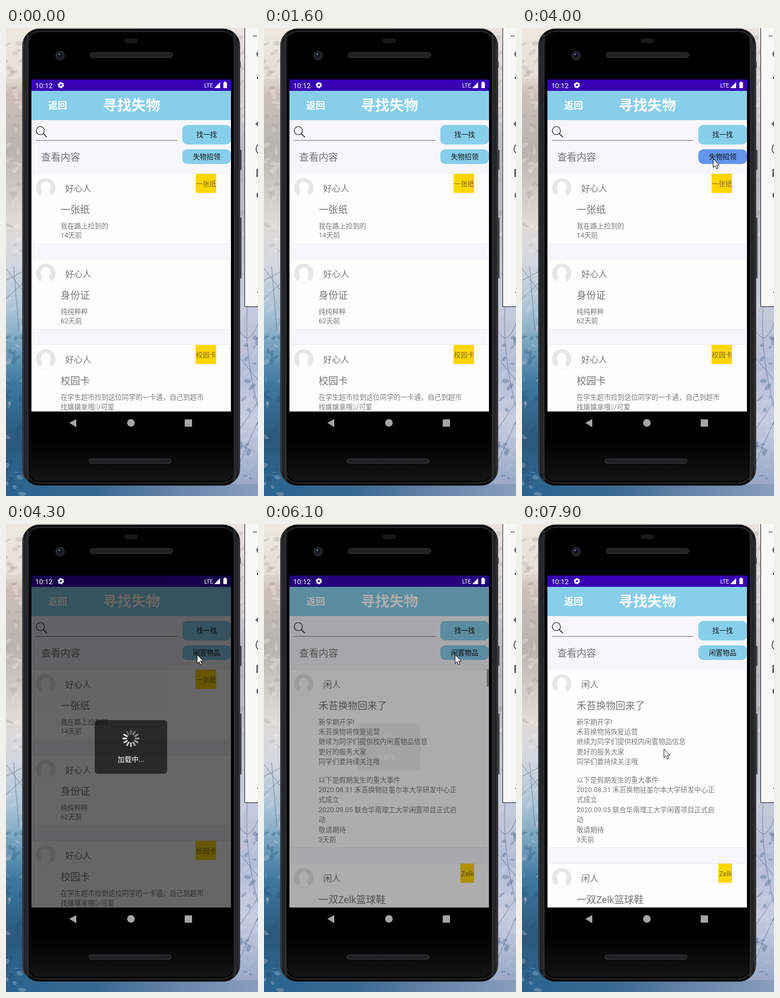
An HTML page for the animation above (8000 ms loop, 466 by 864 pixels).

```html
<!DOCTYPE html>
<html lang="zh-CN">
<head>
<meta charset="utf-8">
<title>寻找失物</title>
<style>
  html, body { margin: 0; width: 100%; height: 100%; overflow: hidden; background: #000; }
  svg { display: block; width: 466px; height: 864px; font-family: Roboto, "Noto Sans CJK SC", "Noto Sans CJK", sans-serif; }
  .small { font-size: 12.6px; fill: #7b7b7b; }
  .title { font-size: 18px; fill: #757575; }
  .name { font-size: 16px; fill: #757575; }
  .tag { font-size: 12.6px; fill: #7d6d1c; text-anchor: middle; }
  .caption { fill: #fff; font-weight: 600; }
  .label { font-size: 12.7px; font-weight: 500; fill: #101418; text-anchor: middle; }

  .list-a, .list-b, .label-a, .label-b, .pressable, .dim, .dialog, .scrollbar, .cursor {
    animation-duration: 8s; animation-iteration-count: infinite; animation-timing-function: linear;
  }
  .list-a { animation-name: until-loaded; animation-timing-function: step-end; }
  .list-b { animation-name: after-loaded; animation-timing-function: step-end; }
  .label-a { animation-name: until-pressed; animation-timing-function: step-end; }
  .label-b { animation-name: after-pressed; animation-timing-function: step-end; }
  .pressable { animation-name: press; animation-timing-function: step-end; }
  .dim { animation-name: dim; }
  .dialog { animation-name: dialog; transform-origin: 231px 412px; }
  .scrollbar { animation-name: scrollbar; }
  .cursor { animation-name: cursor; }
  .spinner { animation: spin 1s steps(12) infinite; transform-origin: 231px 396px; }

  @keyframes until-loaded { 0% { visibility: visible } 75%, 100% { visibility: hidden } }
  @keyframes after-loaded { 0% { visibility: hidden } 75%, 100% { visibility: visible } }
  @keyframes until-pressed { 0% { visibility: visible } 52%, 100% { visibility: hidden } }
  @keyframes after-pressed { 0% { visibility: hidden } 52%, 100% { visibility: visible } }
  @keyframes press { 0% { fill: #87ceeb } 48.7% { fill: #6495ed } 52%, 100% { fill: #87ceeb } }
  @keyframes dim {
    0%, 51.2% { opacity: 0 } 53.7%, 75% { opacity: .6 } 76.25% { opacity: .32 } 78.2%, 100% { opacity: 0 }
  }
  @keyframes dialog {
    0%, 51.2% { opacity: 0; transform: scale(.9) } 53.5%, 75% { opacity: 1; transform: none }
    76.25% { opacity: .08; transform: scale(.88) } 77%, 100% { opacity: 0; transform: scale(.85) }
  }
  @keyframes scrollbar { 0%, 74.99% { opacity: 0 } 75%, 79% { opacity: 1 } 82%, 100% { opacity: 0 } }
  @keyframes cursor {
    0%, 24.9% { transform: translate(480px, 338px) }
    25% { transform: translate(466px, 330px); animation-timing-function: ease-out }
    30%, 32% { transform: translate(364px, 271px); animation-timing-function: ease-in-out }
    40%, 88% { transform: translate(353px, 241px); animation-timing-function: ease-in-out }
    98%, 100% { transform: translate(262px, 415px) }
  }
  @keyframes spin { to { transform: rotate(360deg) } }
</style>
</head>
<body>
<svg viewBox="0 0 466 864">
  <defs>
    <linearGradient id="left" x2="0" y2="1">
      <stop stop-color="#efe9e0"/><stop offset=".1" stop-color="#e6ded6"/>
      <stop offset=".14" stop-color="#cbc0b8"/><stop offset=".26" stop-color="#b9b3b0"/>
      <stop offset=".41" stop-color="#dfd9d6"/><stop offset=".5" stop-color="#d5d7de"/>
      <stop offset=".6" stop-color="#aac4d6"/><stop offset=".69" stop-color="#6d9cba"/>
      <stop offset=".76" stop-color="#3f789f"/><stop offset=".88" stop-color="#2b587c"/>
      <stop offset="1" stop-color="#306a94"/>
    </linearGradient>
    <linearGradient id="right" x2="0" y2="1">
      <stop stop-color="#e9e4e2"/><stop offset=".3" stop-color="#b7b4bc"/>
      <stop offset=".6" stop-color="#c6cadc"/><stop offset=".72" stop-color="#b2bdd6"/>
      <stop offset=".84" stop-color="#c6cce0"/><stop offset="1" stop-color="#8fa2c2"/>
    </linearGradient>
    <linearGradient id="ground">
      <stop stop-color="#2a648f"/><stop offset=".35" stop-color="#376891"/>
      <stop offset=".65" stop-color="#6482a8"/><stop offset="1" stop-color="#8a9dbc"/>
    </linearGradient>
    <linearGradient id="rim">
      <stop stop-color="#46474b"/><stop offset=".012" stop-color="#141416"/><stop offset=".024" stop-color="#303134"/>
      <stop offset=".034" stop-color="#050506"/><stop offset=".966" stop-color="#050506"/>
      <stop offset=".976" stop-color="#303134"/><stop offset=".988" stop-color="#141416"/><stop offset="1" stop-color="#46474b"/>
    </linearGradient>
    <linearGradient id="chin" x2="0" y2="1">
      <stop stop-color="#000"/><stop offset="1" stop-color="#131314"/>
    </linearGradient>
    <clipPath id="screen"><path d="M47 95H416V708H47z"/></clipPath>
    <g id="avatar">
      <circle r="18" fill="#e6e6e6"/>
      <ellipse cy="-1" rx="9" ry="10.5" fill="#fefefe"/>
      <path d="M-6 6H6L10 15Q0 20-10 15Z" fill="#fefefe"/>
    </g>
  </defs>

  <!-- Painted wallpaper -->
  <path d="M0 0H240V864H0z" fill="url(#left)"/>
  <path d="M240 0H466V864H240z" fill="url(#right)"/>
  <path d="M0 842H466V864H0z" fill="url(#ground)"/>
  <g id="strokes"></g>
  <g fill="none" stroke="#4a5a7c" stroke-width=".8" opacity=".75">
    <path d="M0 444L32 486M0 466L32 449M0 500L32 470M0 688L32 742M14 440L24 560"/>
    <path d="M433 560Q450 590 466 545M433 610L466 650M446 515Q440 600 466 700M433 740L466 690M433 800L466 726"/>
  </g>

  <!-- Emulator toolbar -->
  <path d="M441.500-1H470V514.500H441.500z" fill="#f8f8f9" stroke="#1a1a1c"/>
  <g fill="#66676c">
    <path d="M456 14H464V15.500H456zM464 90H466V94H464zM461 177L466 172V182zM463 260H466V275H463z"/>
    <circle cx="469" cy="48" r="6"/><circle cx="469" cy="309" r="6"/><circle cx="466" cy="488" r="1.500"/>
    <path d="M466 215Q459 224 466 231" fill="none" stroke="#66676c" stroke-width="2"/>
  </g>

  <!-- Phone body -->
  <path d="M431 62H434V74H431zM432 225H435.500V262H432zM432 350H435.500V462H432z" fill="#45464b"/>
  <rect x="30.500" y="1.500" width="402" height="843" rx="31" fill="url(#rim)" stroke="#27282b"/>
  <rect x="36" y="6" width="391" height="834" rx="27" fill="none" stroke="#292a2d" stroke-width="2"/>
  <rect x="42" y="10" width="379" height="826" rx="22"/>
  <path d="M42 752H421V814Q421 836 399 836H64Q42 836 42 814z" fill="url(#chin)"/>
  <g fill="#202123" stroke="#3c3d40">
    <rect x="155.500" y="45.500" width="153" height="9" rx="4.500"/>
    <rect x="153.500" y="795.500" width="152" height="8" rx="4"/>
    <rect x="219" y="19" width="25" height="9" rx="4.500" stroke="none" fill="#18181a"/>
    <circle cx="100" cy="51" r="8"/>
  </g>
  <circle cx="100" cy="50" r="4" fill="#10142a"/><circle cx="98.500" cy="48.500" r="1.500" fill="#7c8290"/>
  <g fill="#a6a6a6">
    <path d="M117 729L130 722V737zM330.500 722.500H344V736H330.500z"/><circle cx="231" cy="729" r="7"/>
  </g>

  <g clip-path="url(#screen)">
    <path d="M47 95H416V708H47z" fill="#f6f6fb"/>
    <path d="M47 95H416V116H47z" fill="#3700b3"/>
    <path d="M47 116H416V170H47z" fill="#87ceeb"/>
    <text class="caption" x="78" y="148.500" font-size="17.500">返回</text>
    <text class="caption" x="179" y="151.500" font-size="26.500">寻找失物</text>
    <circle cx="63.500" cy="189.500" r="7.500" fill="none" stroke="#18181a" stroke-width="1.200"/>
    <path d="M69 195L75.500 201.500" stroke="#18181a" stroke-width="1.600"/>
    <path d="M55 207.500H317" stroke="#757575" stroke-width="1.200"/>
    <text class="title" x="65" y="244.500">查看内容</text>
    <rect x="326" y="179" width="90" height="36" rx="9" fill="#87ceeb"/>
    <rect class="pressable" x="326" y="224" width="90" height="27" rx="9"/>
    <text class="label" x="371" y="201">找一找</text>
    <text class="label label-a" x="371" y="241.500">失物招领</text>
    <text class="label label-b" x="371" y="241.500">闲置物品</text>

    <g class="list-a" id="listA"></g>
    <g class="list-b" id="listB"></g>
    <path class="scrollbar" d="M412 268H416V300H412z" fill="#9a9a9c"/>
    <path class="dim" d="M47 95H416V708H47z"/>

    <g fill="#fff">
      <text x="54" y="110.500" font-size="13">10:12</text>
      <text x="366.500" y="109.500" font-size="10.500">LTE</text>
      <circle cx="101.500" cy="105.500" r="3.400" fill="none" stroke="#fff" stroke-width="2.800"/>
      <circle cx="101.500" cy="105.500" r="5" fill="none" stroke="#fff" stroke-width="1.600" stroke-dasharray="2.600 2.636"/>
      <path d="M385 111L396 100V111zM402 100.500H403.500V99H406.500V100.500H408.500V111H402z"/>
    </g>

    <g class="dialog">
      <rect x="164" y="362" width="134" height="99" rx="6" fill-opacity=".6"/>
      <g class="spinner" id="spinner" stroke="#fff" stroke-width="3" stroke-linecap="round"></g>
      <text x="231" y="439" font-size="13" fill="#fff" text-anchor="middle">加载中...</text>
    </g>
  </g>

  <g class="cursor">
    <path d="M.5.500V16.500L4.200 13L6.800 19L9.400 17.900L6.900 12H12z" fill="#fff" stroke="#111" stroke-linejoin="round"/>
  </g>
</svg>
<script>
  const byId = id => document.getElementById(id);
  const text = (cls, x, y, value) => `<text class="${cls}" x="${x}" y="${y}">${value}</text>`;

  // lines: pairs of [offset from the card top, text]
  function card(top, height, name, title, lines, tag = '', tagWidth = 38) {
    const tagBox = tag && `<path d="M${388.5 - tagWidth} ${top}h${tagWidth}v35.500h${-tagWidth}z" fill="#ffd700"/>`
      + text('tag', 389 - tagWidth / 2, top + 22.5, tag);
    return `<rect x="47.500" y="${top - .5}" width="368" height="${height}" rx="3" fill="#fefefe" stroke="#ebebf0"/>`
      + `<use href="#avatar" x="73.500" y="${top + 26}"/>`
      + text('name', 109.5, top + 33, name)
      + text('title', 101, top + 72.5, title)
      + lines.map(([dy, line]) => text('small', 101, top + dy, line)).join('')
      + tagBox;
  }

  byId('listA').innerHTML =
    card(269, 130, '好心人', '一张纸', [[100.5, '我在路上捡到的'], [118, '14天前']], '一张纸')
    + card(427, 130, '好心人', '身份证', [[100.5, '纯纯粹粹'], [118, '62天前']])
    + card(585, 150, '好心人', '校园卡',
      [[100.5, '在学生超市捡到这位同学的一卡通，自己到超市'], [119, '找嬢嬢拿哦']], '校园卡')
    + '<path d="M165.500 694.500h3v9h-3z" fill="none" stroke="#9a9a9a" stroke-width=".7"/>'
    + text('small', 170, 704, '/可爱');

  const notice = ['新学期开学!', '禾苔换物将恢复运营', '继续为同学们提供校内闲置物品信息', '更好的服务大家', '同学们要持续关注哦',
    '以下是假期发生的重大事件', '2020.08.31 禾苔换物驻墨尔本大学研发中心正', '式成立',
    '2020.09.05 联合华南理工大学闲置项目正式启', '动', '敬请期待', '3天前'];
  byId('listB').innerHTML =
    card(269, 329, '闲人', '禾苔换物回来了',
      notice.map((line, i) => [100.5 + i * 18.4 + (i > 4 ? 15 : 0), line]))
    + card(627, 150, '闲人', '一双Zelk篮球鞋', [], 'Zelk', 25.5);

  byId('spinner').innerHTML = Array.from({ length: 12 }, (_, i) =>
    `<path d="M231 387.500V381.500" opacity="${(.3 + i * .06).toFixed(2)}" transform="rotate(${i * 30 + 240} 231 396)"/>`).join('');

  // Brush marks along the visible edges of the wallpaper
  let seed = 11;
  const random = () => (seed = seed * 16807 % 2147483647) / 2147483647;
  const tones = ['#f4eee8', '#a39c9a', '#d2d8e6', '#1f4c72'];
  byId('strokes').innerHTML = Array.from({ length: 220 }, (_, i) => {
    const y = random() * 864;
    const x = i % 2 ? 433 + random() * 33 : random() * 30;
    const tone = tones[y > 560 ? 2 + (random() > .5) : y < 420 ? Math.floor(random() * 2) : 2];
    return `<ellipse cx="${x}" cy="${y}" rx="${2 + random() * 7}" ry="${1 + random() * 4}" fill="${tone}" opacity=".28"
      transform="rotate(${random() * 120 - 90} ${x} ${y})"/>`;
  }).join('');
</script>
</body>
</html>
```
